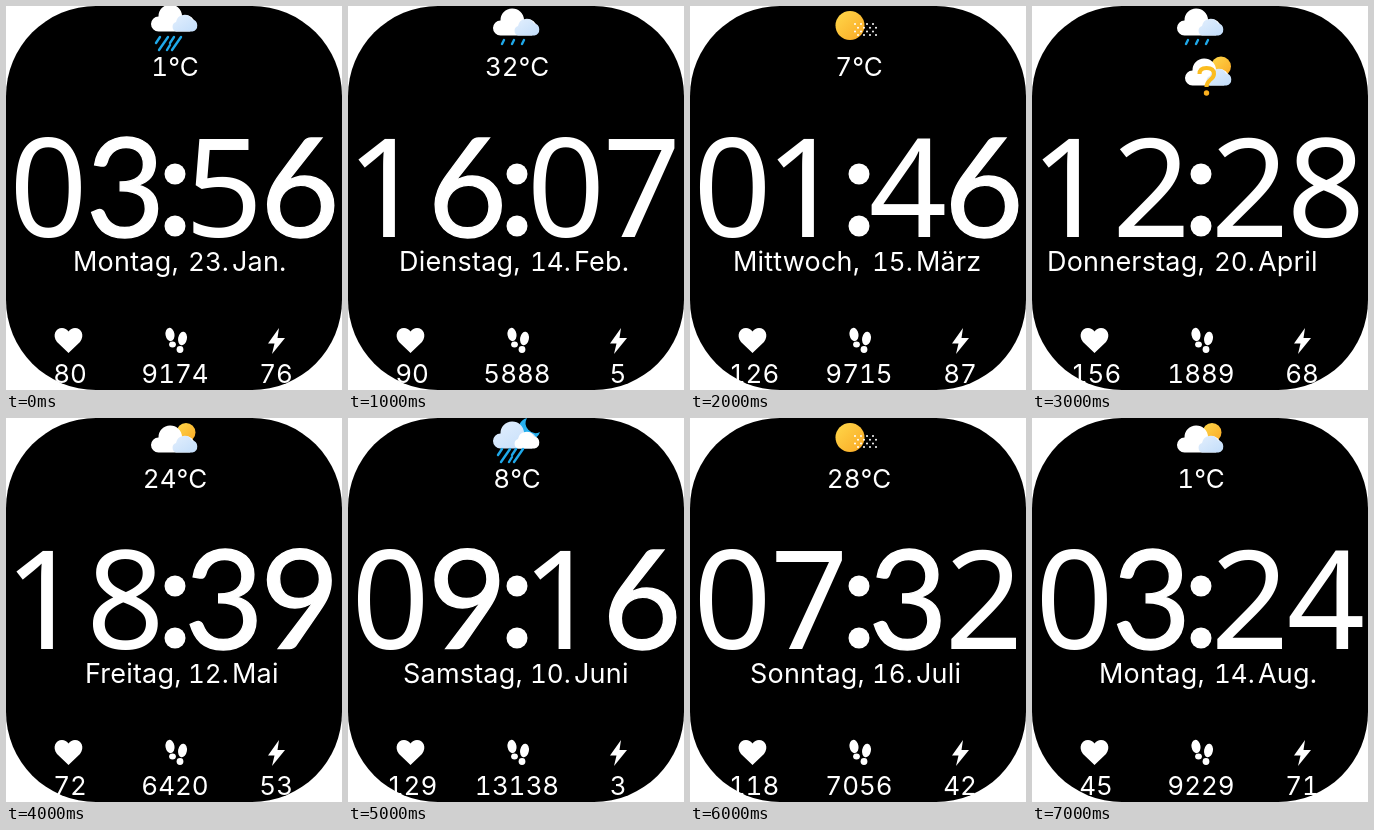
Animation of 336x384 px, one loop 8 s. Source, as an HTML page:

```html
<!DOCTYPE html>
<html lang="de">
<head>
<meta charset="utf-8">
<style>
  html, body { margin: 0; width: 100%; height: 100%; overflow: hidden; background: #fff }
  svg { display: block; width: 336px; height: 384px; fill: #fff }
  text { font: 26px Inter, sans-serif; font-variant-numeric: tabular-nums }
  .mid { text-anchor: middle }
  .word { font-size: 27px; letter-spacing: .2px }
  .big { font: 137px "Noto Sans", sans-serif; text-anchor: middle }
  .round { font-family: Lato, sans-serif; stroke: #fff; stroke-width: 1.4 }
  .rain { fill: none; stroke: #1fa9ea; stroke-width: 2.4; stroke-linecap: round }
</style>
</head>
<body>
<svg viewBox="0 0 336 384">
  <defs>
    <linearGradient id="sun" x2="1" y2="1">
      <stop stop-color="#ffd84a"/><stop offset="1" stop-color="#f9a825"/>
    </linearGradient>
    <linearGradient id="haze" x2="1" y2="1">
      <stop stop-color="#e3effd"/><stop offset="1" stop-color="#c2ddfa"/>
    </linearGradient>
  </defs>
  <rect width="336" height="384" rx="90" fill="#000"/>
  <path d="M62.500 347L51 336C46 329.500 49.500 322 56 322Q60 322 62.500 325.500Q65 322 69 322C75.500 322 79 329.500 74 336Z"/>
  <g>
    <ellipse cx="164" cy="328.500" rx="4.500" ry="6.700" transform="rotate(-10 164 328.500)"/>
    <ellipse cx="166.500" cy="338.500" rx="3.400" ry="3"/>
    <ellipse cx="176.500" cy="332.500" rx="4.400" ry="6.900" transform="rotate(10 176.500 332.500)"/>
    <ellipse cx="174" cy="343.500" rx="3.400" ry="3.400"/>
  </g>
  <path d="M273 322L262 337.500H268.500L266 348L279 332H271.500Z"/>
  <circle cx="169" cy="168" r="10.500"/>
  <circle cx="169" cy="220" r="10.500"/>
  <g id="face"></g>
</svg>
<script>
const DIGIT_X = [42.5, 119.5, 218, 294];

const text = (x, y, value, cls = '') => `<text x="${x}" y="${y}" class="${cls}">${value}</text>`;
const circle = (x, y, r, fill) => `<circle cx="${x}" cy="${y}" r="${r}" fill="${fill}"/>`;
const sun = (x, y, r) => circle(x, y, r, 'url(#sun)');
const rain = d => `<path class="rain" d="${d}"/>`;
const drizzle = rain('M156 34l-2 4M166 34l-2 4M176 34l-2 4');
const downpour = rain('M154 31l-4 6M162 31l-9 13M168 31l-4 6M175 31l-9 13M164 39l-3 5');

// Flat-based cloud whose top edge sits at y, with a smaller one in front.
const cloud = (x, y, back = '#fff', front = 'url(#haze)') => `<g transform="translate(${x} ${y})">
  <path fill="${back}" d="M7.500 25.500A7.500 7.500 0 0 1 7.500 10.500A11.500 11.500 0 0 1 31 10A8 8 0 0 1 39 25.500Z"/>
  <path fill="${front}" d="M25 25.500A5 5 0 0 1 25 16A8.500 8.500 0 0 1 41 13.500A6.100 6.100 0 0 1 41.500 25.500Z"/></g>`;

const hazeDots = () => {
  let dots = '';
  for (let row = 0; row < 4; row++)
    for (let i = 0; i < 4; i++)
      dots += circle(165 + i * 6 + (row % 2) * 3, 18 + row * 3.7, 1, '#fff');
  return dots;
};

const icons = {
  heavy: cloud(145, 0) + downpour,
  light: cloud(145, 4) + drizzle,
  hazy: sun(160, 19.5, 14.5) + hazeDots(),
  partly: sun(180, 14.5, 9.5) + cloud(145, 9),
  night: '<path fill="#27b0ee" d="M179 0A10 10 0 0 0 192 14A11 11 0 1 1 179 0Z"/>' +
    cloud(145, 5, 'url(#haze)', '#fff') + downpour
};

const unknown = sun(189, 60.5, 10) + cloud(153, 54) +
  `<path d="M167.500 68Q167.500 62 174.500 62Q182 62 182 68Q182 71 178 74Q174.500 77 174.500 81"
    fill="none" stroke="#fbbc1f" stroke-width="4"/>` + circle(174.5, 87, 2.7, '#fbb01f');

// icon, temperature, time, weekday x, weekday, day, month, pulse, steps, battery
const states = [
  ['heavy', 1, '0356', 67, 'Montag', 23, 'Jan.', 80, 9174, 76],
  ['light', 32, '1607', 51, 'Dienstag', 14, 'Feb.', 90, 5888, 5],
  ['hazy', 7, '0146', 43, 'Mittwoch', 15, 'März', 126, 9715, 87],
  ['light', null, '1228', 15, 'Donnerstag', 20, 'April', 156, 1889, 68],
  ['partly', 24, '1839', 79, 'Freitag', 12, 'Mai', 72, 6420, 53],
  ['night', 8, '0916', 55, 'Samstag', 10, 'Juni', 129, 13138, 3],
  ['hazy', 28, '0732', 60, 'Sonntag', 16, 'Juli', 118, 7056, 42],
  ['partly', 1, '0324', 67, 'Montag', 14, 'Aug.', 45, 9229, 71]
];

const bigDigit = (d, i) =>
  text(DIGIT_X[i] - (d === '1' ? 5 : 0), 230.5, d, '369'.includes(d) ? 'big round' : 'big');

function draw([icon, temp, time, x, weekday, day, month, pulse, steps, battery]) {
  return icons[icon] +
    (temp === null ? unknown : text(169, 70, temp + '°C', 'mid')) +
    [...time].map(bigDigit).join('') +
    text(x, 265, weekday + ',', 'word') +
    text(182, 265, day + '.') +
    text(226, 265, month, 'word') +
    text(64, 377, pulse, 'mid') + text(169, 377, steps, 'mid') + text(270, 377, battery, 'mid');
}

const face = document.getElementById('face');
let shown = -1;
function tick() {
  const index = Math.floor(performance.now() / 1000) % states.length;
  if (index !== shown) face.innerHTML = draw(states[shown = index]);
  requestAnimationFrame(tick);
}
tick();
</script>
</body>
</html>
```
